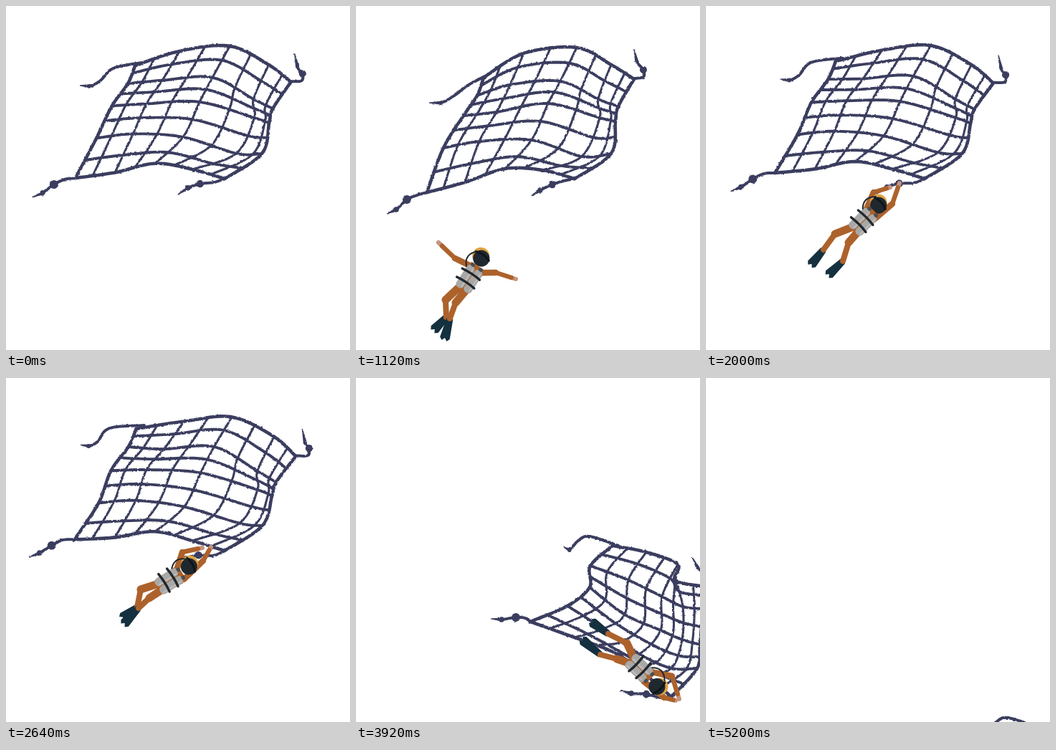
Write an HTML page that moves like this. It is 480 by 480 pixels and loops after 5280 ms.

```html
<!DOCTYPE html>
<html lang="en">
<head>
<meta charset="utf-8">
<title>Diver towing a net</title>
<style>
  html, body { margin: 0; width: 100%; height: 100%; overflow: hidden; background: #fff; }
  svg { display: block; width: 100vw; height: 100vh; }
</style>
</head>
<body>
<svg id="stage" viewBox="0 0 480 480">
  <defs>
    <filter id="rough" filterUnits="userSpaceOnUse" x="-20" y="-20" width="520" height="520">
      <feTurbulence type="fractalNoise" baseFrequency="0.3" numOctaves="2" seed="4"/>
      <feDisplacementMap in="SourceGraphic" scale="2.6" xChannelSelector="R" yChannelSelector="G"/>
    </filter>
  </defs>
  <g id="net" filter="url(#rough)" stroke-linecap="round" stroke-linejoin="round"></g>
  <g id="diver" stroke-linecap="round" stroke-linejoin="round"></g>
</svg>
<script>
const LOOP = 5280, STEP = 80, CELLS = 8;
const ROPE = '#3a3d5e', SUIT = '#ad622b', SKIN = '#c6937d', FIN = '#15303f', DARK = '#20282f', TANK = '#a9a8a6', GOLD = '#e0a344';

// Each net shape is a 5 x 5 control mesh, top row first.
const meshes = {
  level: [
    180,84, 242,63, 312,56, 366,82, 397,106,
    170,109, 218,104, 288,100, 345,130, 372,143,
    148,140, 196,137, 270,134, 346,156, 367,163,
    126,185, 177,179, 247,183, 321,206, 357,206,
    97,241, 152,233, 208,220, 260,228, 305,241],
  lifted: [
    178,100, 234,66, 308,58, 356,82, 388,102,
    169,125, 215,110, 285,105, 338,130, 366,140,
    150,153, 196,148, 268,136, 340,156, 362,161,
    122,198, 172,189, 245,187, 315,210, 356,206,
    99,260, 152,246, 208,227, 260,229, 305,241],
  pulled: [
    245,122, 300,117, 350,117, 388,141, 428,160,
    230,150, 290,158, 345,168, 386,174, 411,182,
    212,183, 265,188, 318,203, 385,216, 411,222,
    193,216, 243,219, 300,231, 375,262, 411,263,
    155,263, 205,268, 257,270, 315,292, 365,309],
  folded: [
    358,234, 405,243, 449,260, 446,283, 495,292,
    327,262, 380,282, 427,305, 456,319, 485,322,
    326,292, 375,330, 425,352, 455,365, 480,372,
    295,318, 345,350, 395,385, 440,405, 476,405,
    243,340, 305,362, 362,384, 405,415, 440,445]
};

// Loose rope ends, five points each: top left, top right, bottom left, bottom right.
const ends = {
  level: [
    188,80, 150,88, 132,105, 117,113, 103,112,
    397,105, 412,104, 413,94, 406,85, 402,66,
    97,241, 82,243, 67,250, 51,262, 37,268,
    305,241, 290,246, 271,248, 254,254, 240,263],
  lifted: [
    182,97, 157,110, 137,125, 119,135, 102,135,
    388,101, 401,99, 401,89, 392,78, 388,60,
    99,260, 85,264, 71,270, 56,284, 43,290,
    305,241, 290,244, 274,249, 257,257, 245,265],
  pulled: [
    252,121, 215,119, 200,130, 184,143, 172,139,
    428,160, 440,155, 438,145, 426,132, 422,119,
    155,263, 138,261, 121,265, 102,272, 88,275,
    365,309, 355,308, 345,306, 335,306, 325,306],
  folded: [
    366,234, 326,221, 310,227, 298,240, 290,236,
    495,292, 500,285, 490,275, 477,265, 469,250,
    243,340, 236,335, 223,334, 203,337, 188,336,
    440,445, 425,446, 405,441, 384,440, 368,436]
};

// head, chest, hip, then elbow + hand and knee + ankle + fin tip for each side
const spread = [175,351, 169,364, 148,396, 138,352, 115,330, 195,372, 223,381,
  125,410, 126,434, 107,454, 139,414, 131,436, 123,467];
const held = [256,262, 247,271, 212,293, 246,243, 274,237, 275,255, 286,236,
  188,295, 183,320, 160,336, 200,307, 185,321, 163,345];
const swim = [
  [0, spread.map((n, i) => n + (i % 2 ? 172 : -70))],
  [560, [140,436, 134,449, 113,481, 132,414, 156,395, 166,433, 174,402,
    88,492, 80,516, 62,538, 108,502, 98,526, 84,550]],
  [1120, spread],
  [1640, [217,304, 209,315, 184,344, 205,283, 228,268, 238,303, 250,276,
    160,352, 150,372, 133,390, 178,364, 165,385, 146,403]],
  [2000, [241,277, 233,287, 206,314, 234,260, 257,253, 260,276, 270,247,
    180,318, 164,340, 145,363, 199,330, 191,356, 169,377]],
  [2640, held],
  [2800, held],
  [3280, [341,317, 326,317, 289,316, 345,293, 370,303, 362,320, 377,309,
    264,302, 245,313, 211,321, 275,324, 247,328, 216,323]],
  [3920, [421,431, 411,420, 382,392, 441,416, 451,448, 430,446, 446,450,
    378,370, 352,357, 327,339, 364,392, 341,386, 314,364]]
];
const exit = [[3920, [0, 0]], [4480, [63, 117]], [5040, [87, 228]], [5200, [95, 253]], [5280, [99, 266]]];

const mix = (a, b, k) => a.map((n, i) => n + (b[i] - n) * k);
const pairs = list => Array.from({ length: list.length / 2 }, (_, i) => list.slice(2 * i, 2 * i + 2));
const groups = (list, size) => Array.from({ length: list.length / size }, (_, i) => list.slice(i * size, (i + 1) * size));
const clamp = (n, lo, hi) => Math.min(hi, Math.max(lo, n));
const toPath = points => 'M' + points.map(p => p.map(n => n.toFixed(1)).join(',')).join('L');

function keyed(keys, t) {
  if (t <= keys[0][0]) return keys[0][1];
  for (let i = 1; i < keys.length; i++) {
    const [t0, a] = keys[i - 1], [t1, b] = keys[i];
    if (t <= t1) return mix(a, b, (t - t0) / (t1 - t0));
  }
  return keys[keys.length - 1][1];
}

// Catmull-Rom through the points, t from 0 to points.length - 1
function spline(points, t) {
  const last = points.length - 1, i = Math.min(last - 1, Math.floor(t)), f = t - i;
  const [a, b, c, d] = [-1, 0, 1, 2].map(k => points[clamp(i + k, 0, last)]);
  return b.map((n, j) => n + f / 2 * (c[j] - a[j]
    + f * (2 * a[j] - 5 * n + 4 * c[j] - d[j] + f * (3 * (n - c[j]) + d[j] - a[j]))));
}
const trace = (points, steps) =>
  Array.from({ length: steps + 1 }, (_, i) => spline(points, i / steps * (points.length - 1)));

function add(parent, tag, attrs = {}) {
  const el = document.createElementNS('http://www.w3.org/2000/svg', tag);
  for (const name in attrs) el.setAttribute(name, attrs[name]);
  return parent.appendChild(el);
}
const line = (parent, color, width) => add(parent, 'path', { fill: 'none', stroke: color, 'stroke-width': width });
const place = (circle, [x, y]) => { circle.setAttribute('cx', x); circle.setAttribute('cy', y); };

const net = document.getElementById('net'), diver = document.getElementById('diver');
const isEdge = i => i % CELLS === 0;
const strands = width => Array.from({ length: CELLS + 1 }, (_, i) => line(net, ROPE, isEdge(i) ? 4.6 : width));
const columns = strands(3.1), rows = strands(3.9);
const tails = [[0, 3], [5, 2], [6, 3.8], [5.2, 3.8]].map(radii => ({
  rope: line(net, ROPE, 4),
  tip: add(net, 'path', { fill: ROPE }),
  knots: radii.map(r => add(net, 'circle', { r, fill: ROPE }))
}));

function taper([x0, y0], [x1, y1], w0, w1, notch = 0) {
  const len = Math.hypot(x1 - x0, y1 - y0) || 1, ux = (x1 - x0) / len, uy = (y1 - y0) / len;
  const at = (along, side) => [x0 + ux * along - uy * side, y0 + uy * along + ux * side];
  return toPath([at(0, -w0), at(len - notch, -w1), at(len, -w1 / 2), at(len - notch, 0),
    at(len, w1 / 2), at(len - notch, w1), at(0, w0)]) + 'Z';
}

function netShape(set, t) {
  const sway = Math.max(-0.75, Math.cos(2 * Math.PI * (Math.min(t, 2800) - 900) / 3500));
  const start = mix(set.level, set.lifted, sway / 0.92);
  const pull = Math.pow(clamp((t - 2780) / 500, 0, 1), 1.2);
  return mix(mix(start, set.pulled, pull), set.folded, clamp((t - 3280) / 640, 0, 1));
}

function drawNet(t) {
  const mesh = groups(netShape(meshes, t), 10).map(pairs);
  for (let i = 0; i <= CELLS; i++) {
    const across = mesh[0].map((_, c) => spline(mesh.map(row => row[c]), i / 2));
    const down = mesh.map(row => spline(row, i / 2));
    rows[i].setAttribute('d', toPath(trace(across, 32)));
    columns[i].setAttribute('d', toPath(trace(down, 32)));
  }
  groups(netShape(ends, t), 10).map(pairs).forEach((points, i) => {
    const { rope, tip, knots } = tails[i];
    rope.setAttribute('d', toPath(trace(points, 24).slice(0, 19)));
    tip.setAttribute('d', taper(points[3], points[4], 2.6, 0.6));
    knots.forEach((knot, k) => place(knot, points[k + 2]));
  });
}

const limb = () => ({
  fin: add(diver, 'path', { fill: FIN }),
  calf: line(diver, SUIT, 8),
  thigh: line(diver, SUIT, 11)
});
const arm = () => ({
  hand: line(diver, SKIN, 6),
  lower: line(diver, SUIT, 6.5),
  upper: line(diver, SUIT, 8.5)
});
const legs = [limb(), limb()], arms = [arm(), arm()];
const head = add(diver, 'g');
const torso = add(diver, 'g');

add(head, 'circle', { cx: 1.5, cy: -2, r: 12, fill: GOLD });
add(head, 'circle', { cx: -1, cy: 0.5, r: 11.6, fill: DARK });
add(head, 'path', { d: 'M3-11Q7 0 2 11', fill: 'none', stroke: '#0f151a', 'stroke-width': 3 });

add(torso, 'path', { d: 'M0-8L32-13L40-10V10L32 13L0 8Z', fill: SUIT });
for (const y of [-12.5, 0.5]) {
  add(torso, 'rect', { x: 0, y, width: 36, height: 12, rx: 5, fill: TANK });
  add(torso, 'rect', { x: 35, y: y + 3, width: 5, height: 6, rx: 2, fill: '#4c4f50' });
}
add(torso, 'path', { d: 'M4-3H32M4 9.5H32', stroke: '#c4c3c0', 'stroke-width': 1.5 });
add(torso, 'path', { d: 'M11-16Q13 0 11 13M25-16Q27 0 25 13', fill: 'none', stroke: DARK, 'stroke-width': 3.4 });
add(torso, 'path', { d: 'M31-13Q43-25 56-12', fill: 'none', stroke: DARK, 'stroke-width': 2 });

function drawDiver(t) {
  const p = pairs(keyed(swim, t)), [skull, chest, hip] = p;
  const angle = Math.atan2(chest[1] - hip[1], chest[0] - hip[0]);
  const beside = ([x, y], along, side) => [
    x + Math.cos(angle) * along - Math.sin(angle) * side,
    y + Math.sin(angle) * along + Math.cos(angle) * side];
  const turn = ([x, y]) => `translate(${x} ${y}) rotate(${angle * 180 / Math.PI})`;

  legs.forEach(({ fin, calf, thigh }, i) => {
    const [knee, ankle, tip] = p.slice(7 + 3 * i, 10 + 3 * i);
    fin.setAttribute('d', taper(ankle, tip, 4.5, 7, 4));
    calf.setAttribute('d', toPath([knee, ankle]));
    thigh.setAttribute('d', toPath([beside(hip, 3, i ? 5 : -5), knee]));
  });
  arms.forEach(({ hand, lower, upper }, i) => {
    const [elbow, end] = p.slice(3 + 2 * i, 5 + 2 * i);
    const wrist = mix(elbow, end, 0.78);
    hand.setAttribute('d', toPath([wrist, end]));
    lower.setAttribute('d', toPath([elbow, wrist]));
    upper.setAttribute('d', toPath([beside(chest, -4, i ? 9 : -9), elbow]));
  });
  torso.setAttribute('transform', turn(hip));
  head.setAttribute('transform', turn(skull));
}

function render(now) {
  const t = Math.floor(now % LOOP / STEP) * STEP;
  const shift = `translate(${keyed(exit, t).join(' ')})`;
  net.setAttribute('transform', shift);
  diver.setAttribute('transform', shift);
  // The rough filter region travels with the net, so keep it over the stage.
  const [dx, dy] = keyed(exit, t), rough = document.getElementById('rough');
  rough.setAttribute('x', -20 - dx);
  rough.setAttribute('y', -20 - dy);
  drawNet(t);
  drawDiver(t);
}

const began = performance.now();
function tick() {
  render(performance.now() - began);
  requestAnimationFrame(tick);
}
tick();
</script>
</body>
</html>
```
